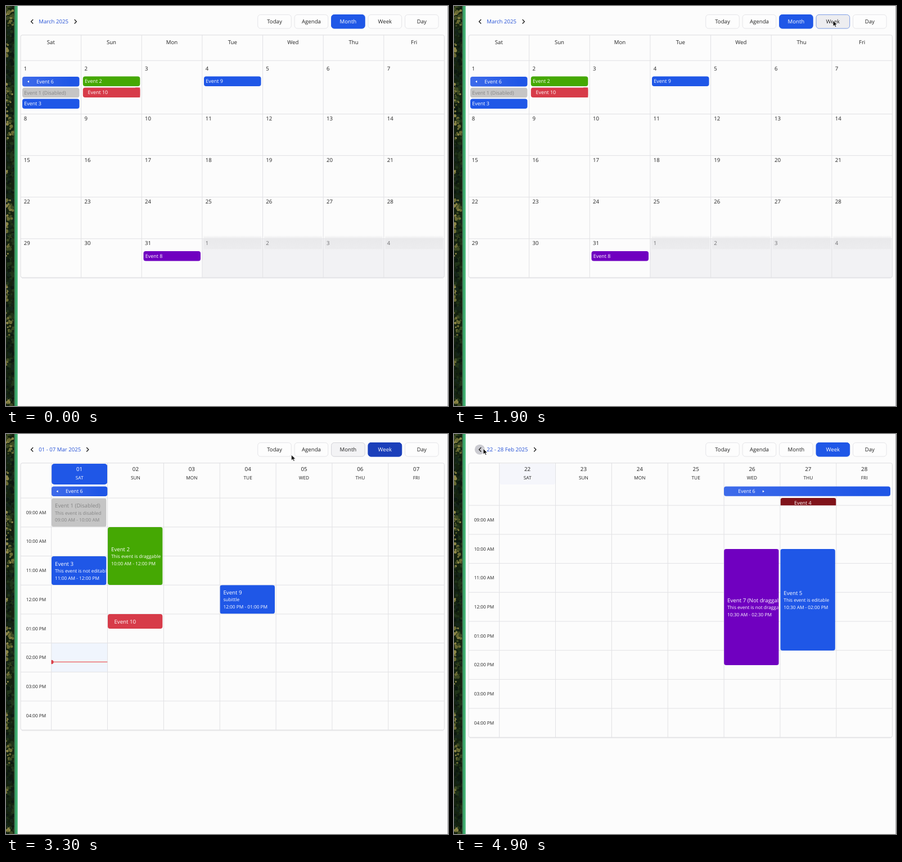
Animation, 786 px wide and 713 px high, one loop 5 s. Source, as an HTML page:

```html
<!DOCTYPE html>
<html lang="en">
<head>
<meta charset="utf-8">
<title>Calendar</title>
<style>
html, body { margin: 0; width: 100%; height: 100%; overflow: hidden; background: #fcfcfc; }
#stage { display: block; width: 786px; height: 713px; }
text { font-family: "Open Sans", "Noto Sans", sans-serif; text-rendering: geometricPrecision; }
#month, #week, #prior { animation: 5s step-end infinite; }
#month { animation-name: month; }
#week { animation-name: week; }
#prior { animation-name: prior; }
@keyframes month { 0% { visibility: visible } 55.7%, 100% { visibility: hidden } }
@keyframes week { 0% { visibility: hidden } 55.7% { visibility: visible } 97.7%, 100% { visibility: hidden } }
@keyframes prior { 0% { visibility: hidden } 97.7%, 100% { visibility: visible } }

.fade { opacity: 0; animation: 5s linear infinite; }
.month-dark { animation-name: month-dark; }
.week-light { animation-name: week-light; }
.week-dark { animation-name: week-dark; }
.month-light { animation-name: month-light; }
.next-hover { animation-name: next-hover; }
.prev-hover { animation-name: prev-hover; }
@keyframes month-dark { 0%, 20% { opacity: 0 } 23%, 28% { opacity: 1 } 32%, 100% { opacity: 0 } }
@keyframes week-light { 0%, 31% { opacity: 0 } 34%, 100% { opacity: 1 } }
@keyframes week-dark { 0%, 65% { opacity: 1 } 69%, 100% { opacity: 0 } }
@keyframes month-light { 0%, 62% { opacity: 0 } 64%, 66% { opacity: 1 } 69%, 100% { opacity: 0 } }
@keyframes next-hover { 0%, 76% { opacity: 0 } 79%, 80% { opacity: 1 } 82% { opacity: .55 } 84%, 100% { opacity: 0 } }
@keyframes prev-hover { 0%, 86% { opacity: 0 } 89%, 96% { opacity: .35 } 97.7%, 100% { opacity: 1 } }

#cursor { animation: cursor 5s linear infinite; }
@keyframes cursor {
  0%, 18% { transform: translate(640px, -16px) }
  22%, 26% { transform: translate(622px, 28px) }
  33%, 38% { transform: translate(674px, 26px) }
  50%, 61% { transform: translate(673.5px, 26px) }
  66% { transform: translate(508px, 37px) }
  78% { transform: translate(140px, 30px) }
  82% { transform: translate(84px, 29px) }
  90%, 100% { transform: translate(52px, 26px) }
}
</style>
</head>
<body>
<svg id="stage" viewBox="0 0 786 713">
  <defs>
    <linearGradient id="edge">
      <stop offset="0" stop-color="#4a5a48"/><stop offset=".25" stop-color="#359a62"/>
      <stop offset=".75" stop-color="#45b576"/><stop offset="1" stop-color="#8fd0aa"/>
    </linearGradient>
    <linearGradient id="span">
      <stop offset="0" stop-color="#3e6bea"/><stop offset=".85" stop-color="#1f56e6"/>
    </linearGradient>
    <linearGradient id="strip" x2="0" y2="1">
      <stop offset="0" stop-color="#ebebed" stop-opacity="0"/><stop offset=".25" stop-color="#e9e9eb"/>
      <stop offset="1" stop-color="#ececee"/>
    </linearGradient>
  </defs>
  <rect width="786" height="713" fill="#fcfcfc"/>
  <g id="forest"></g>
  <g id="bar"></g>
  <g id="month"></g>
  <g id="week"></g>
  <g id="prior"></g>
  <path id="cursor" d="M0 0V10.2L2.4 8.1L4 11.6L5.8 10.8L4.3 7.4H7.4Z" fill="#111" stroke="#fff" stroke-width=".8"/>
</svg>
<script>
const BLUE = '#1f57e7', DARK = '#1a38ab', GREEN = '#45a803', RED = '#d73b49', PURPLE = '#7000c0';
const INK = '#222', LINE = '#e1e1e4', GREY = '#c5c5c5', FADED = '#858585';
const LEFT = 26, RIGHT = 779.5, TOP = 51.8;

const rect = (x, y, w, h, fill, r = 0, extra = '') =>
  `<rect x="${x}" y="${y}" width="${w}" height="${h}" rx="${r}" fill="${fill}" ${extra}/>`;
const text = (s, x, y, size = 9.65, fill = INK, anchor = 'start') =>
  `<text x="${x}" y="${y}" font-size="${size}" fill="${fill}" text-anchor="${anchor}">${s}</text>`;
const mid = (s, x, y, size, fill) => text(s, x, y, size, fill, 'middle');
const path = (d, stroke, w = 1) => `<path d="${d}" fill="none" stroke="${stroke}" stroke-width="${w}"/>`;
const range = n => [...Array(n).keys()];
const put = (id, parts) => { document.getElementById(id).innerHTML = parts.flat().join(''); };

function button(i, fill, ink, border, cls = '') {
  const x = 447.7 + i * 65.45;
  const label = ['Today', 'Agenda', 'Month', 'Week', 'Day'][i];
  return `<g class="${cls}">${rect(x, 15.5, 59.6, 24.5, fill, 5, `stroke="${border}"`)}${mid(label, x + 29.8, 31, 9.65, ink)}</g>`;
}

const chevron = (x, dir) => path(`M${x - 1.8 * dir} 24L${x + 1.8 * dir} 27.7L${x - 1.8 * dir} 31.4`, '#222', 1.4);

const heading = (label, nextX) => [text(label, 58.3, 31, 9.6, '#2450d6'), chevron(nextX, 1)];

function grid(xs, ys) {
  const bottom = ys[ys.length - 1];
  return [
    path(xs.map(x => `M${x} ${TOP}V${bottom}`).join(''), LINE),
    path(ys.slice(0, -1).map(y => `M${LEFT} ${y}H${RIGHT}`).join(''), LINE),
    path(`M${LEFT + 2} ${bottom + 1}H${RIGHT - 2}`, '#ededef', 1.5),
    rect(LEFT, TOP, RIGHT - LEFT, bottom - TOP, 'none', 3, 'stroke="#dcdcdf"')
  ];
}

const arrow = (x, y, dir) => `<path d="M${x + 1.5 * dir} ${y}L${x - 1.5 * dir} ${y - 2}V${y + 2}Z" fill="#fff"/>`;

const chip = (label, x, y, fill, ink = '#fff', dx = 3.3) =>
  rect(x, y, 101.5, 17.5, fill, 4) + text(label, x + dx, y + 11.7, 8.95, ink);

// Event card; its text is clipped by the nested viewport.
function card(x, y, h, fill, lines, base, ink = '#fff') {
  const rows = lines.map((s, i) => text(s, 6, base + [0, 12.4, 25][i], i ? 8.3 : 9.7, ink));
  return `<svg x="${x}" y="${y}" width="97.6" height="${h}">${rect(0, 0, 97.6, h, fill, 4)}` +
    `<svg width="96.5" height="${h}">${rows.join('')}</svg></svg>`;
}

function forest() {
  let seed = 11;
  const rnd = () => (seed = seed * 16807 % 2147483647) / 2147483647;
  const dark = ['#0c1810', '#15261a', '#203419'], light = ['#3d4a22', '#6a6b33', '#8b8546'];
  const trees = range(620).map(() => {
    const x = rnd() * 15, y = rnd() * 713;
    const glow = Math.sin(y / 11) + Math.sin(y / 29 + 1) - x / 9 + rnd();
    const tones = glow > .35 ? light : dark;
    return `<circle cx="${x.toFixed(1)}" cy="${y.toFixed(1)}" r="${(1 + rnd() * 2.3).toFixed(1)}" fill="${tones[Math.floor(rnd() * 3)]}"/>`;
  });
  return [rect(0, 0, 15, 713, '#14220f'), trees, rect(14.5, 0, 6.5, 713, 'url(#edge)'), rect(21, 0, 1, 713, '#fff')];
}

function monthView() {
  const col = i => LEFT + i * 107.64;
  const ys = [97.3, 192.6, 266.6, 340.7, 414.8, 484];
  const days = ['Sat', 'Sun', 'Mon', 'Tue', 'Wed', 'Thu', 'Fri'];
  const cells = range(35).map(i => {
    const row = Math.floor(i / 7), x = col(i % 7), other = i > 30;
    const base = row ? ys[row] + 11.2 : 114.6;
    return (other ? rect(x + 2.5, 409, 103, 24.5, 'url(#strip)') : '') +
      text(other ? i - 30 : i + 1, x + 5.8, base, 9.65, other ? '#6d6d70' : INK);
  });
  return [
    heading('March 2025', 123.5),
    button(2, BLUE, '#fff', BLUE),
    button(2, DARK, '#fff', DARK, 'fade month-dark'),
    button(3, '#ededf0', INK, '#7f9fe6', 'fade week-light'),
    rect(col(3), 414.8, RIGHT - col(3), 69, '#f2f2f4'),
    grid(range(6).map(i => col(i + 1)), ys),
    days.map((d, i) => mid(d, col(i) + 53.8, 68.2)),
    cells,
    chip('Event 6', 29, 126, 'url(#span)', '#fff', 25.3), arrow(39.5, 134.7, -1),
    chip('Event 1 (Disabled)', 29, 145.8, GREY, FADED),
    chip('Event 3', 29, 165.4, BLUE),
    chip('Event 2', 136.8, 125.6, GREEN),
    chip('Event 10', 136.8, 145.4, RED, '#fff', 8.7), rect(230, 145.4, 8.3, 17.5, RED),
    chip('Event 9', 352, 125.6, BLUE),
    chip('Event 8', 244.5, 437, PURPLE)
  ];
}

function weekBase(first, top) {
  const col = i => 80.7 + i * 99.85;
  const days = ['SAT', 'SUN', 'MON', 'TUE', 'WED', 'THU', 'FRI'];
  const hours = ['09', '10', '11', '12', '01', '02', '03', '04'];
  return [
    button(3, BLUE, '#fff', BLUE),
    grid(range(7).map(col), range(9).map(i => top + i * 51.7)),
    days.map((d, i) => {
      const ink = first === 1 && !i ? '#fff' : INK, x = col(i) + 49.9;
      return mid(String(first + i).padStart(2, '0'), x, 66.2, 9.8, ink) + mid(d, x, 80.6, 8.3, ink);
    }),
    hours.map((h, i) => mid(`${h}:00 ${i < 3 ? 'AM' : 'PM'}`, 53.5, top + 28.6 + i * 51.7, 8.2))
  ];
}

function weekView() {
  return [
    heading('01 - 07 Mar 2025', 145),
    rect(81, 372.8, 99.3, 51.4, '#f0f5fd'),
    rect(81, 53, 99.3, 37, BLUE, 5),
    weekBase(1, 114.1),
    button(3, DARK, '#fff', DARK, 'fade week-dark'),
    button(2, '#f3f3f5', INK, '#d5d5da', 'fade month-light'),
    rect(81, 93.5, 99.3, 17.5, 'url(#span)', 4), text('Event 6', 106, 105.3, 8.95, '#fff'), arrow(91, 102.2, -1),
    card(81, 114.4, 51.2, GREY, ['Event 1 (Disabled)', 'This event is disabled', '09:00 AM - 10:00 AM'], 17, FADED),
    card(181, 166, 103, GREEN, ['Event 2', 'This event is draggable', '10:00 AM - 12:00 PM'], 42.7),
    card(81, 218, 51, BLUE, ['Event 3', 'This event is not editable', '11:00 AM - 12:00 PM'], 16.7),
    card(380.4, 269.3, 51.3, BLUE, ['Event 9', 'subittle', '12:00 PM - 01:00 PM'], 16.8),
    rect(181, 321, 97.3, 26, RED, 4), text('Event 10', 192.4, 337.6, 9.7, '#fff'),
    path('M81 406.4H180.3', '#ea5a56', 1.4),
    '<path d="M81 403.2a3.3 3.3 0 0 1 0 6.6Z" fill="#d9414a" stroke="#d9414a"/>'
  ];
}

function priorView() {
  return [
    heading('22 - 28 Feb 2025', 144),
    rect(81, 53, 99.3, 37, '#f5f6fb', 4),
    weekBase(22, 127.2),
    rect(480, 93.4, 296, 17.4, 'url(#span)', 4), text('Event 6', 505.2, 105.2, 8.95, '#fff'), arrow(550.3, 102.2, 1),
    `<svg x="580.5" y="114" width="99" height="13.2">${rect(0, 0, 99, 18, '#80131a', 4)}${text('Event 4', 24.6, 11.8, 8.95, '#fff')}</svg>`,
    card(480.1, 205, 207, PURPLE, ['Event 7 (Not draggable)', 'This event is not draggable', '10:30 AM - 02:30 PM'], 94.7),
    card(580.3, 205, 181, BLUE, ['Event 5', 'This event is editable', '10:30 AM - 02:00 PM'], 81.6)
  ];
}

put('forest', forest());
put('bar', [
  rect(785, 0, 1, 713, '#a9a9ac'),
  range(5).map(i => button(i, '#fdfdfd', INK, '#e5e5e8')),
  '<circle class="fade prev-hover" cx="45.8" cy="27.7" r="9" fill="#cbcbd1"/>',
  '<circle class="fade next-hover" cx="145" cy="27.7" r="10" fill="#e9e9ec"/>',
  chevron(46.4, -1)
]);
put('month', monthView());
put('week', weekView());
put('prior', priorView());
</script>
</body>
</html>
```
